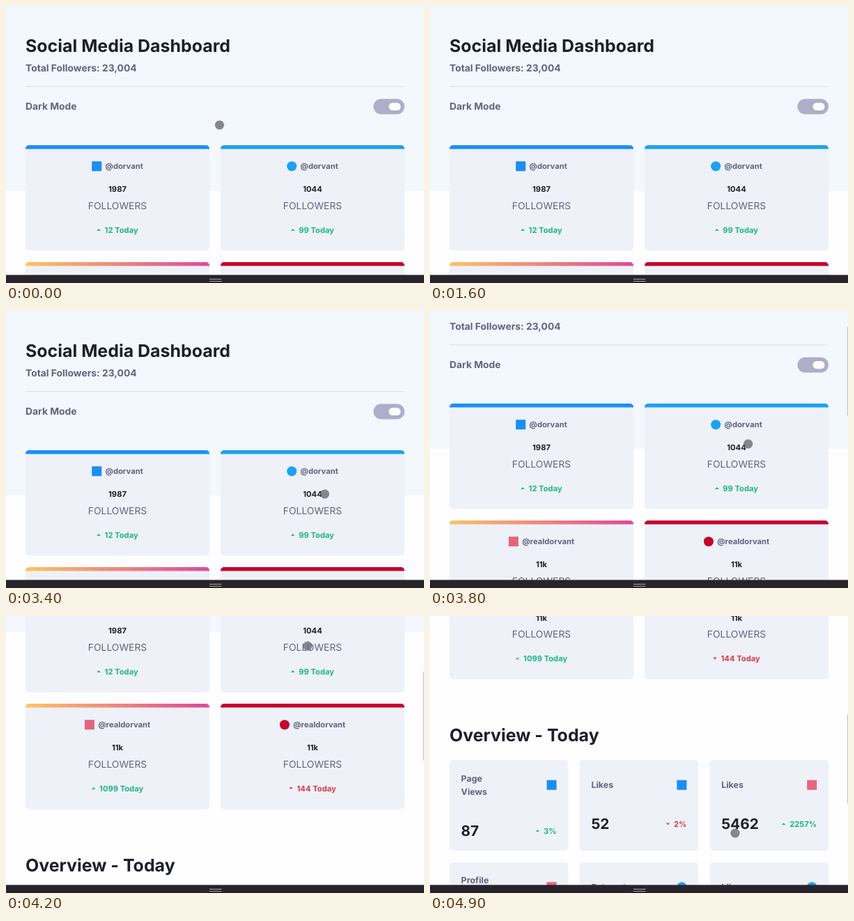
Recreate the animation shown at these times as an HTML page. Size 600x398 px, loop 5 s.

```html
<!DOCTYPE html>
<html lang="en">
<head>
<meta charset="utf-8">
<title>Social Media Dashboard</title>
<style>
  html, body { margin: 0; width: 100%; height: 100%; overflow: hidden; background: #fefdff; }
  svg {
    display: block; width: 600px; height: 398px;
    font-family: Inter, "Liberation Sans", sans-serif; text-rendering: geometricPrecision;
  }
</style>
</head>
<body>
<svg viewBox="0 0 600 398" xmlns="http://www.w3.org/2000/svg">
  <defs>
    <linearGradient id="sunset">
      <stop offset="0" stop-color="#fdc366"/>
      <stop offset="1" stop-color="#df4996"/>
    </linearGradient>
  </defs>
  <g id="page"></g>
  <rect id="thumb" x="599" width="1" height="128" fill="#bcbcc2"/>
  <circle id="dot" r="6.3" fill="#65656b" fill-opacity=".76" stroke="#606066" stroke-opacity=".5" stroke-width=".7"/>
  <rect y="386.4" width="600" height="12" fill="#272529"/>
  <path d="M292 392.5h17.5M292 395.5h17.5" stroke="#a9a8ab"/>
</svg>
<script>
const NS = 'http://www.w3.org/2000/svg';
const $ = id => document.getElementById(id);
const page = $('page');
const REM = 13.85, LEFT = 28;
const INK = '#1d1f2b', SOFT = '#60647f', CARD = '#eef1f8', UP = '#1fb488', DOWN = '#d93a44';
const BLUE = '#198ff5', SKY = '#1da1f2', PINK = '#e5657f', RED = '#c4032a';

function add(tag, attrs) {
  const el = document.createElementNS(NS, tag);
  for (const k in attrs) el.setAttribute(k, attrs[k]);
  return page.appendChild(el);
}

// y is the middle of the capitals
function text(str, x, y, rem, fill, anchor = 'start', weight = 700) {
  const size = rem * REM;
  const el = add('text', {
    x, y: y + size * 0.3635, 'font-size': size, 'font-weight': weight, fill, 'text-anchor': anchor
  });
  el.textContent = str;
  return el;
}

function rect(x, y, width, height, fill, rx = 0) {
  return add('rect', { x, y, width, height, fill, rx });
}

function badge(x, y, fill, round) {
  return rect(x, y - 7, 14, 14, fill, round ? 7 : 0);
}

// small label with an icon in front; x is the centre of the row, or its right end
function row(str, x, y, fill, iconWidth, drawIcon, centred = true) {
  const label = text(str, x, y, 0.81, fill);
  const width = label.getComputedTextLength();
  const start = centred ? x - (width - iconWidth) / 2 - iconWidth + iconWidth / 2 - iconWidth / 2 : x - width;
  const left = centred ? x - (width + iconWidth) / 2 : start - iconWidth;
  label.setAttribute('x', left + iconWidth);
  drawIcon(left);
}

function trend(str, x, y, up, centred) {
  const fill = up ? UP : DOWN, dir = up ? 1 : -1;
  row(str, x, y, fill, 11.3, left =>
    add('path', { d: `M${left} ${y + 1.3 * dir}h5.6l-2.8 ${-2.8 * dir}z`, fill }), centred);
}

function profile(x, y, p) {
  const mid = x + 132;
  rect(x, y, 264, 151.5, CARD, 5);
  add('path', { d: `M${x} ${y + 5.5}v-.5a5 5 0 0 1 5-5h254a5 5 0 0 1 5 5v.5z`, fill: p.stripe || p.color });
  row(p.handle, mid, y + 30.2, SOFT, 19.3, left => badge(left, y + 30.2, p.color, p.round));
  text(p.count, mid, y + 63.3, 0.81, INK, 'middle');
  text('FOLLOWERS', mid, y + 87, 1, SOFT, 'middle', 400);
  trend(p.today + ' Today', mid, y + 121.6, !p.falling, true);
}

function stat(x, y, s) {
  const words = s.label.split(' ');
  const top = y + 35.5, low = top + 46.3 + words.length * 9.7;
  words.forEach((word, i) => text(word, x + 16.6, top + (i - (words.length - 1) / 2) * 19.5, 0.9, SOFT));
  badge(x + 139.6, top, s.color, s.round);
  text(s.value, x + 16.6, low, 1.5, INK);
  trend(s.change, x + 153.6, low, !s.falling, false);
}

rect(0, 0, 600, 265, '#f3f7fe');
text('Social Media Dashboard', LEFT, 57.2, 1.8, INK);
text('Total Followers: 23,004', LEFT, 89.2, 1, SOFT);
rect(LEFT, 115, 544, 1.3, '#e1e4ef');
text('Dark Mode', LEFT, 144.4, 1, SOFT);
rect(527.5, 133.5, 44.5, 22, '#aeaec7', 11);
rect(549.5, 139, 17, 11, '#fdfdff', 5.5);

[
  { handle: '@dorvant', count: '1987', today: '12', color: BLUE },
  { handle: '@dorvant', count: '1044', today: '99', color: SKY, round: true },
  { handle: '@realdorvant', count: '11k', today: '1099', color: PINK, stripe: 'url(#sunset)' },
  { handle: '@realdorvant', count: '11k', today: '144', falling: true, color: RED, round: true }
].forEach((p, i) => profile(LEFT + i % 2 * 280, 200 + (i >> 1) * 168, p));

text('Overview - Today', LEFT, 599.9, 1.8, INK);
[
  { label: 'Page Views', value: '87', change: '3%', color: BLUE },
  { label: 'Likes', value: '52', change: '2%', falling: true, color: BLUE },
  { label: 'Likes', value: '5462', change: '2257%', color: PINK },
  { label: 'Profile Views', value: '52k', change: '1375%', color: PINK },
  { label: 'Retweets', value: '117', change: '303%', color: SKY, round: true },
  { label: 'Likes', value: '507', change: '553%', color: SKY, round: true }
].forEach((s, i) => {
  const x = LEFT + i % 3 * 186.8, y = 636 + Math.floor(i / 3) * 146.5;
  rect(x, y, 170.3, 129.7, CARD, 5);
  stat(x, y, s);
});

const mix = (a, b, f) => a + (b - a) * f;
const ease = f => f * f * (3 - 2 * f);

// pointer: each move runs from the end of the one before it
const moves = [
  { end: 900, at: () => [306.5, 171] },
  { end: 1600, at: f => [mix(306.5, -9, f), mix(171, 162, f)] },
  { end: 2700, at: f => [mix(-32, 476, f), mix(123, 174, f)] },
  { end: 3200, at: f => [mix(476, 457.5, f) + 30 * Math.sin(Math.PI * f), mix(174, 263, ease(f))] },
  { end: 3400, at: () => [457.5, 263] },
  { end: 4200, at: f => [mix(457.5, 433, f ** 5), mix(263, 43, f ** 1.61)] },
  { end: 4900, at: f => [mix(433, 438, f) + 5 * Math.sin(Math.PI * f), mix(43, 312, f ** 1.1)] }
];

function pointer(t) {
  const i = moves.findIndex(m => t <= m.end), start = i ? moves[i - 1].end : 0;
  return moves[i].at((t - start) / (moves[i].end - start));
}

// dragged with growing speed, then gliding to rest
function scrollAt(t) {
  if (t <= 3400) return 0;
  if (t <= 4200) return 242 * ((t - 3400) / 800) ** 1.853;
  return 242 + 193.6 * (1 - Math.exp((4200 - t) / 210));
}

function draw() {
  const t = Math.floor(performance.now() % 5000 / 100) * 100;
  const [x, y] = pointer(t), s = scrollAt(t);
  page.setAttribute('transform', `translate(0 ${-s})`);
  $('dot').setAttribute('transform', `translate(${x} ${y})`);
  $('thumb').setAttribute('y', s * 0.33);
  $('thumb').setAttribute('visibility', s > 0 ? 'visible' : 'hidden');
  requestAnimationFrame(draw);
}
draw();
</script>
</body>
</html>
```
